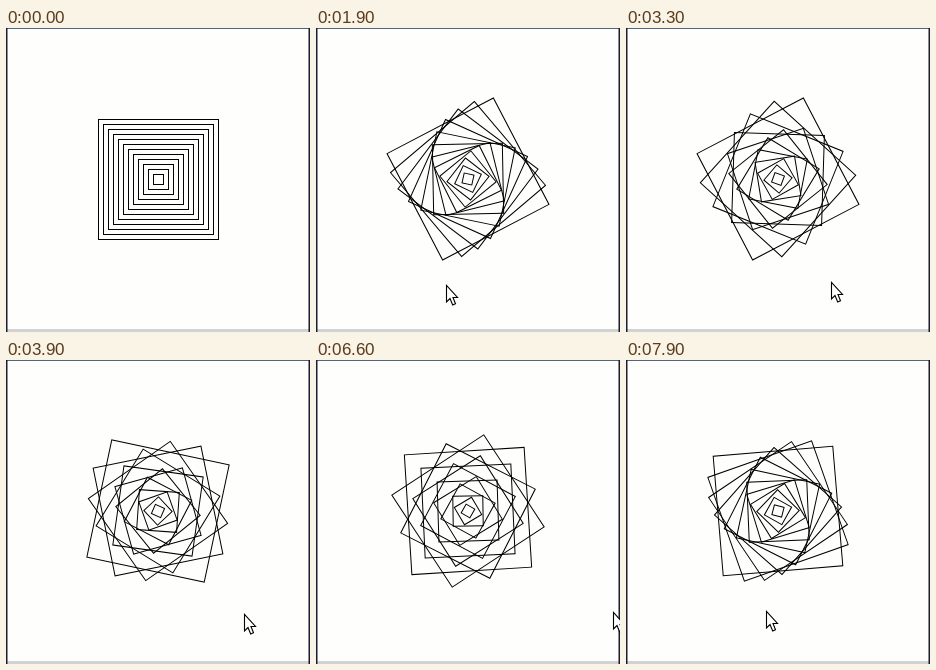
Write an HTML page that moves like this. It is 304 px wide and 304 px high and loops after 8 s.

```html
<!DOCTYPE html>
<html lang="en">
<head>
<meta charset="utf-8">
<title>Twisting squares</title>
<style>
html, body { margin: 0; width: 100%; height: 100%; overflow: hidden; background: #fefefd; }
svg { display: block; width: 100vw; height: 100vh; }
</style>
</head>
<body>
<svg viewBox="0 0 304 304">
  <rect width="304" height="304" fill="#fefefd"/>
  <g id="squares" fill="none" stroke="#000"></g>
  <rect y="301" width="304" height="3" fill="#d2d2d2"/>
  <rect width="304" height="1" fill="#50667f"/>
  <rect width="1.5" height="304" fill="#1c1c30"/>
  <rect x="302.5" width="1.5" height="304" fill="#1c1c30"/>
  <path id="cursor" d="M.5 .5V17L4 13.5L6.7 20L9.5 18.8L7 12.5H11.5Z" fill="#fff" stroke="#000" stroke-width="1.1"/>
</svg>
<script>
const LOOP = 8000, STEP = 100, COUNT = 12;

// pointer x at a few moments of the sweep: [time, x]
const sweep = [
  [0, -15], [900, 66], [1900, 130], [2700, 169], [3900, 237.5],
  [5200, 281.5], [6300, 298], [6600, 296.5], [7900, 140]
];

const group = document.getElementById("squares");
const cursor = document.getElementById("cursor");
const squares = [];
for (let n = 1; n <= COUNT; n++) {
  const r = document.createElementNS("http://www.w3.org/2000/svg", "rect");
  r.setAttribute("x", -5 * n);
  r.setAttribute("y", -5 * n);
  r.setAttribute("width", 10 * n);
  r.setAttribute("height", 10 * n);
  group.appendChild(r);
  squares.push(r);
}

const secant = i => (sweep[i + 1][1] - sweep[i][1]) / (sweep[i + 1][0] - sweep[i][0]);

// harmonic mean of the neighbouring secants: smooth, never overshoots
function slope(i) {
  if (i === 0) return secant(0);
  if (i === sweep.length - 1) return secant(i - 1);
  const a = secant(i - 1), b = secant(i);
  return a * b > 0 ? 2 * a * b / (a + b) : 0;
}

function pointerX(t) {
  t = Math.max(0, t);
  let i = 0;
  while (i < sweep.length - 2 && t > sweep[i + 1][0]) i++;
  const [t0, x0] = sweep[i], [t1, x1] = sweep[i + 1];
  const h = t1 - t0, p = Math.min(1, (t - t0) / h), q = 1 - p;
  const x = x0 * q * q * (1 + 2 * p) + x1 * p * p * (3 - 2 * p)
          + h * p * q * (slope(i) * q - slope(i + 1) * p);
  return Math.round(x);
}

function pointerY(t) {
  return Math.round(254 + 32 * Math.exp((100 - t) / 750) - 3.5 * (t / LOOP) ** 4);
}

function draw(time) {
  const t = Math.floor((time % LOOP) / STEP) * STEP;
  // the squares trail the pointer by half a step
  const twist = Math.max(0, pointerX(t - STEP / 2)) / 10;
  // upright lines snap to whole pixels
  const snap = twist ? 0 : 0.5;
  group.setAttribute("transform", `translate(${152 + snap} ${151 + snap})`);
  squares.forEach((r, i) => r.setAttribute("transform", `rotate(${(i + 1) * twist})`));
  cursor.setAttribute("transform", `translate(${pointerX(t)} ${pointerY(t)})`);
}

const start = performance.now();
function tick() {
  draw(performance.now() - start);
  requestAnimationFrame(tick);
}
tick();
</script>
</body>
</html>
```
